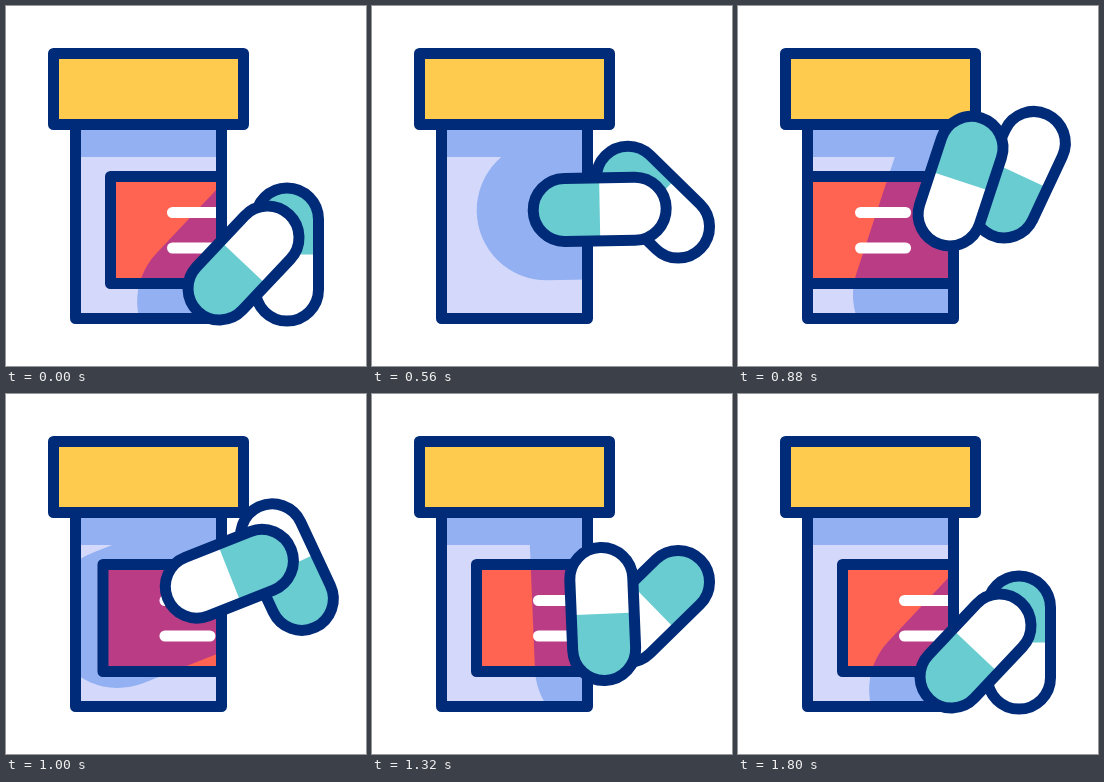
An HTML page with a canvas for the animation above (2000 ms loop, 360 by 360 pixels).

```html
<!DOCTYPE html>
<html lang="en">
<head>
<meta charset="utf-8">
<title>Pill bottle</title>
<style>
  html, body { margin: 0; width: 100%; height: 100%; overflow: hidden; background: #fff; }
  canvas { display: block; width: 360px; height: 360px; }
</style>
</head>
<body>
<canvas id="stage"></canvas>
<script>
const LOOP = 2000, STEP = 40, SIZE = 360;
const NAVY = '#002b78', YELLOW = '#fecb4f', LIGHT = '#d4d9fb', BLUE = '#93b1f2';
const RED = '#ff6352', PURPLE = '#ba3c85', TEAL = '#68ccd1', WHITE = '#fff';
const LABEL = { x: 104.5, y: 170.5, w: 188, h: 107, travel: 440 };

const canvas = document.getElementById('stage');
const ctx = canvas.getContext('2d');
const ratio = window.devicePixelRatio || 1;
canvas.width = canvas.height = SIZE * ratio;

// Symmetric cubic-bezier(a, 0, 1 - a, 1) between two times
function ease(t, from, to, a) {
  const u = Math.min(1, Math.max(0, (t - from) / (to - from)));
  let lo = 0, hi = 1;
  for (let i = 0; i < 24; i++) {
    const s = (lo + hi) / 2, r = 1 - s;
    const x = 3 * a * s * r * r + 3 * (1 - a) * s * s * r + s * s * s;
    if (x < u) lo = s; else hi = s;
  }
  return lo * lo * (3 - 2 * lo);
}

function box(x, y, w, h, r = 0) {
  const path = new Path2D();
  path.roundRect(x, y, w, h, r);
  return path;
}

function fill(path, color) {
  ctx.fillStyle = color;
  ctx.fill(path);
}

function outline(path) {
  ctx.strokeStyle = NAVY;
  ctx.lineWidth = 11;
  ctx.lineJoin = 'round';
  ctx.stroke(path);
}

function inside(path, draw) {
  ctx.save();
  ctx.clip(path);
  draw();
  ctx.restore();
}

const bottle = box(69.5, 118, 146, 194.5);
const cap = box(47.5, 47.5, 190, 71);
const capsule = box(-31.5, -66.5, 63, 133, 31.5);
const shade = box(-70, -123, 140, 313, 70);

function placed(pose, path) {
  const out = new Path2D();
  out.addPath(path, new DOMMatrix().translate(pose.x, pose.y).rotate(pose.angle));
  return out;
}

function drawPill(pose) {
  ctx.save();
  ctx.translate(pose.x, pose.y);
  ctx.rotate(pose.angle * Math.PI / 180);
  fill(capsule, WHITE);
  inside(capsule, () => fill(box(-40, -80, 80, 80), TEAL));
  outline(capsule);
  ctx.restore();
}

function drawLabel(x, shadow) {
  const body = box(x, LABEL.y, LABEL.w, LABEL.h);
  fill(body, RED);
  inside(body, () => fill(shadow, PURPLE));
  for (const dy of [30.5, 66]) fill(box(x + 56.5, LABEL.y + dy, 56, 11, 5.5), WHITE);
  outline(body);
}

function draw(t) {
  const turn = 360 * ease(t, 160, 1720, 0.45);
  const lift = ease(t, 155, 845, 0.45) - ease(t, 850, 1740, 0.42);
  const slide = LABEL.travel * ease(t, 145, 1088, 0.42);
  const front = { x: 237.5 - 15 * lift, y: 257 - 82 * lift, angle: 223.3 + turn };
  const back = { x: 281, y: 248.5 - 80 * lift, angle: -turn };
  const shadow = placed(front, shade);

  ctx.setTransform(ratio, 0, 0, ratio, 0, 0);
  fill(box(0, 0, SIZE, SIZE), WHITE);
  fill(bottle, LIGHT);
  inside(bottle, () => {
    fill(box(70, 118, 145, 33), BLUE);
    fill(shadow, BLUE);
    drawLabel(LABEL.x + slide, shadow);
    drawLabel(LABEL.x + slide - LABEL.travel, shadow);
  });
  outline(bottle);
  fill(cap, YELLOW);
  outline(cap);
  drawPill(back);
  drawPill(front);
}

const start = performance.now();
function tick() {
  const t = (performance.now() - start) % LOOP;
  draw(Math.floor(t / STEP) * STEP);
  requestAnimationFrame(tick);
}
tick();
</script>
</body>
</html>
```
